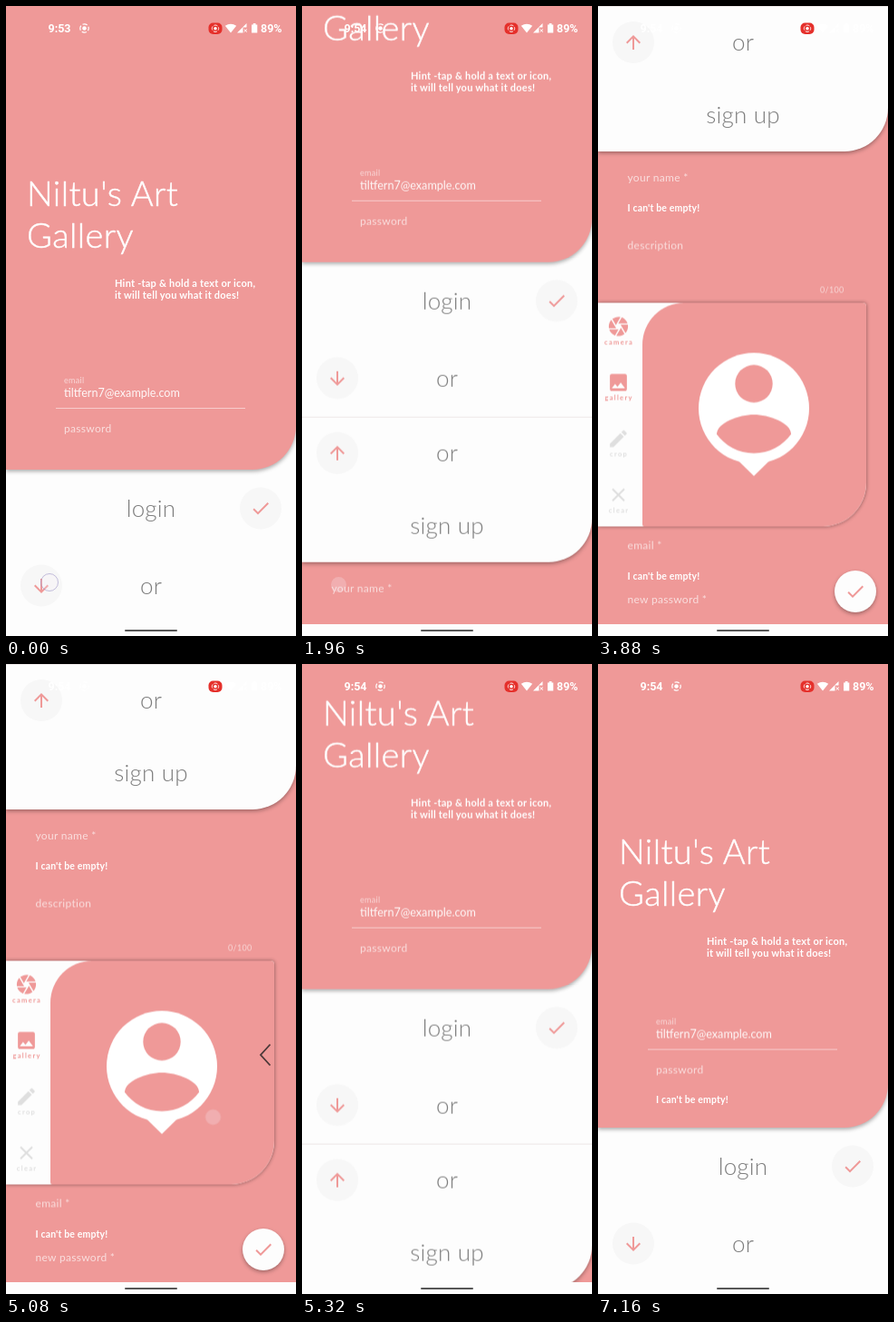
These frames come from a looping animation (320 px wide and 693 px high, 8400 ms). An HTML page:

```html
<!DOCTYPE html>
<html lang="en">
<head>
<meta charset="utf-8">
<title>Art gallery login</title>
<style>
html, body { margin: 0; width: 100%; height: 100%; overflow: hidden; background: #fdfdfd; }
svg { display: block; width: 100vw; height: 100vh; }
:root { --rose: #ef9998; --paper: #fdfdfd; --loop: 8.4s linear infinite; }

text { font-family: Lato, "Open Sans", sans-serif; font-weight: 300; fill: #fff; white-space: pre; }
.title { font-size: 38px; letter-spacing: .4px; stroke: #fff; stroke-width: .5px; }
.head { font-size: 26px; letter-spacing: .2px; text-anchor: middle; fill: #7d7d7d; }
.hint { font-size: 11px; font-weight: 700; letter-spacing: .22px; }
.field { font-size: 12px; font-weight: 400; letter-spacing: .3px; fill-opacity: .68; }
.small { font-size: 9px; font-weight: 400; letter-spacing: .3px; fill-opacity: .62; }
.value { font-size: 12.6px; font-weight: 400; fill-opacity: .92; }
.error { font-size: 10.5px; font-weight: 700; letter-spacing: .15px; }
.tag { font-size: 7.5px; font-weight: 700; letter-spacing: 1.3px; text-anchor: middle; fill: inherit; }
.status text { font: 600 12.5px Roboto, Inter, sans-serif; }

.rose { fill: var(--rose); }
.paper { fill: var(--paper); }
.disc { fill: #f7f7f7; }
.off { fill: #dfdfdf; }
.raised { filter: drop-shadow(0 2px 2px rgba(0,0,0,.32)); }
.card { filter: drop-shadow(0 .5px 2px rgba(0,0,0,.45)); }

.touch { fill: rgba(246,240,246,.25); stroke: rgba(150,140,195,.6); stroke-width: .9; }
.ripple { fill: rgba(0,0,0,.055); transform-box: fill-box; transform-origin: center; }

#pages { animation: pages var(--loop); }
@keyframes pages {
  0%, 22.11% { transform: translateY(0); }
  25.79%, 60.49% { transform: translateY(-680px); }
  64.17%, 100% { transform: translateY(0); }
}

/* validation messages push the fields apart */
.push { animation: push var(--loop); }
@keyframes push {
  0%, 43.33% { transform: translateY(0); animation-timing-function: ease-in-out; }
  45.71%, 100% { transform: translateY(18.5px); }
}
.warn { animation: warn var(--loop); }
@keyframes warn {
  0%, 43.33% { opacity: 0; transform: translateY(-4px); }
  45.71%, 100% { opacity: 1; transform: translateY(0); }
}
.lift { animation: lift var(--loop); }
@keyframes lift {
  0%, 82.38% { transform: translateY(0); animation-timing-function: ease-in-out; }
  84.76%, 100% { transform: translateY(-18.5px); }
}
.warn-login { animation: warn-login var(--loop); }
@keyframes warn-login {
  0%, 82.38% { opacity: 0; transform: translateY(-4px); }
  84.76%, 100% { opacity: 1; transform: translateY(0); }
}

.before { animation: before var(--loop); }
.after { animation: after var(--loop); }
@keyframes before { 0%, 5.71% { opacity: 1; } 5.72%, 100% { opacity: 0; } }
@keyframes after { 0%, 5.71% { opacity: 0; } 5.72%, 100% { opacity: 1; } }

#hold { animation: hold var(--loop); }
@keyframes hold {
  0%, 1.43% { opacity: 1; transform: translate(48px, 634px); }
  9.5% { opacity: 1; transform: translate(40px, 637px); }
  11.43%, 100% { opacity: 0; transform: translate(40px, 637px); }
}
#hold-ripple { animation: hold-ripple var(--loop); }
@keyframes hold-ripple {
  0%, 1.43% { opacity: 0; transform: scale(.3); }
  3% { opacity: 1; }
  9.5% { opacity: 1; transform: scale(1); }
  11.43%, 100% { opacity: 0; transform: scale(1); }
}

#tap { animation: tap var(--loop); }
@keyframes tap {
  0%, 17.14% { opacity: 0; stroke-opacity: 1; }
  18%, 21.2% { opacity: 1; stroke-opacity: 1; }
  22.5%, 23.4% { opacity: 1; stroke-opacity: 0; }
  25%, 100% { opacity: 0; stroke-opacity: 0; }
}
#tap-ripple { animation: tap-ripple var(--loop); }
@keyframes tap-ripple {
  0%, 17.14% { opacity: 0; transform: scale(.3); }
  18.2% { opacity: 1; }
  21% { opacity: 1; transform: scale(1); }
  23%, 100% { opacity: 0; transform: scale(1); }
}

#submit { animation: submit var(--loop); }
@keyframes submit {
  0%, 39.05% { opacity: 0; }
  39.8%, 43.5% { opacity: 1; }
  46.19%, 100% { opacity: 0; }
}
#submit-ripple { animation: submit-ripple var(--loop); }
@keyframes submit-ripple {
  0%, 39.05% { opacity: 0; transform: scale(.3); }
  40% { opacity: 1; }
  43.5% { opacity: 1; transform: scale(1); }
  46.19%, 100% { opacity: 0; transform: scale(1); }
}

#login { animation: login var(--loop); }
@keyframes login {
  0%, 79.05% { opacity: 0; }
  79.8%, 82.5% { opacity: 1; }
  85%, 100% { opacity: 0; }
}
#login-ripple { animation: login-ripple var(--loop); }
@keyframes login-ripple {
  0%, 79.05% { opacity: 0; transform: scale(.3); }
  80% { opacity: 1; }
  82.5% { opacity: 1; transform: scale(1); }
  85.24%, 100% { opacity: 0; transform: scale(1); }
}

/* back gesture from the right edge */
#swipe { animation: swipe var(--loop); stroke: none; }
@keyframes swipe {
  0%, 59.05% { opacity: 0; transform: translate(316px, 497px); }
  59.3% { opacity: 1; }
  60.46%, 61.95% { opacity: 1; transform: translate(228.5px, 498.5px); }
  62.9%, 100% { opacity: 0; transform: translate(228.5px, 498.5px); }
}
#chevron { animation: chevron var(--loop); }
@keyframes chevron {
  0%, 59.05% { opacity: 0; transform: translateX(28px); }
  60.46%, 62.1% { opacity: 1; transform: translateX(0); }
  62.9%, 100% { opacity: 0; transform: translateX(14px); }
}
</style>
</head>
<body>
<svg viewBox="0 0 320 693" preserveAspectRatio="none">
  <defs>
    <path id="down" d="M8 0L6.59-1.41 1 4.17V-8h-2V4.17L-6.58-1.42-8 0 0 8z"/>
    <path id="check" d="M-3 4.17L-7.17 0l-1.42 1.41L-3 7 9-5 7.59-6.41z"/>
    <g id="rec">
      <circle r="4.7" fill="none" stroke="#fff" stroke-width="1.2" stroke-dasharray="5.4 2" stroke-dashoffset="2.7"/>
      <circle r="2.3" fill="#fff"/>
    </g>
    <clipPath id="page"><rect width="320" height="680"/></clipPath>
  </defs>

  <rect class="paper" width="320" height="693"/>

  <g id="pages">
    <!-- login page -->
    <path class="rose raised" d="M0 0H320V462A48 48 0 0 1 272 510H0z"/>
    <text class="title" x="23" y="220">Niltu's Art</text>
    <text class="title" x="23" y="266">Gallery</text>
    <text class="hint" x="120" y="308.5">Hint -tap &amp; hold a text or icon,</text>
    <text class="hint" x="120" y="321.5">it will tell you what it does!</text>
    <g class="lift">
      <text class="small" x="64" y="415">email</text>
      <text class="value" x="64" y="430">tiltfern7@example.com</text>
      <path d="M55 442.5H264" stroke="#fff" stroke-opacity=".5"/>
      <text class="field" x="64" y="469">password</text>
    </g>
    <text class="error warn-login" x="64" y="483">I can't be empty!</text>

    <text class="head" x="160" y="562">login</text>
    <circle class="disc" cx="281" cy="552.5" r="23"/>
    <circle id="login-ripple" class="ripple" cx="281" cy="552.5" r="31"/>
    <use href="#check" class="rose" x="281" y="552.5"/>
    <text class="head" x="160" y="646.5">or</text>
    <circle class="disc" cx="39" cy="637.5" r="23"/>
    <circle id="hold-ripple" class="ripple" cx="39" cy="638" r="31"/>
    <circle id="tap-ripple" class="ripple" cx="39" cy="638" r="31"/>
    <use href="#down" class="rose" x="39" y="638"/>

    <!-- sign-up page -->
    <g transform="translate(0 680)" clip-path="url(#page)">
      <rect class="rose" y="80" width="320" height="620"/>
      <g class="push">
        <text class="field" x="32.5" y="249">description</text>
        <text class="small" x="245" y="297">0/100</text>
        <g class="card">
          <path class="paper" d="M0 308H292A4 4 0 0 1 296 312V506A48 48 0 0 1 248 554H0z"/>
          <path class="rose" d="M95 308H292A4 4 0 0 1 296 312V506A48 48 0 0 1 248 554H51Q49 554 49 552V354A46 46 0 0 1 95 308z"/>
        </g>
        <circle cx="172" cy="424" r="61" fill="#fff"/>
        <path d="M150 477L172 498.5 194 477z" fill="#fff"/>
        <circle class="rose" cx="172" cy="397" r="20.7"/>
        <path class="rose" d="M172 431C156 431 131 440 131 452.5C140 465 155 473.5 172 473.5S204 465 213 452.5C213 440 188 431 172 431z"/>
        <g class="rose" transform="translate(22.5 334)">
          <path transform="scale(1.06) translate(-12 -12)" d="M9.4 10.5l4.77-8.26C13.47 2.09 12.75 2 12 2c-2.4 0-4.6.85-6.32 2.25l3.66 6.35.06-.1zM21.54 9c-.92-2.92-3.15-5.26-6-6.34L11.88 9h9.66zm.26 1h-7.49l.29.5 4.76 8.25C21 16.97 22 14.61 22 12c0-.69-.07-1.35-.2-2zM8.54 12l-3.9-6.75C3.01 7.03 2 9.39 2 12c0 .69.07 1.35.2 2h7.49l-1.15-2zm-6.08 3c.92 2.92 3.15 5.26 6 6.34L12.12 15H2.46zm11.27 0l-3.9 6.76c.7.15 1.42.24 2.17.24 2.4 0 4.6-.85 6.32-2.25l-3.66-6.35-.93 1.6z"/>
          <text class="tag" x=".6" y="19.5">camera</text>
        </g>
        <g class="rose" transform="translate(22.5 395.7)">
          <path transform="scale(1.04) translate(-12 -12)" d="M21 19V5c0-1.1-.9-2-2-2H5c-1.1 0-2 .9-2 2v14c0 1.1.9 2 2 2h14c1.1 0 2-.9 2-2zM8.5 13.5l2.5 3.01L14.5 12l4.5 6H5l3.5-4.5z"/>
          <text class="tag" x=".6" y="19.5">gallery</text>
        </g>
        <g class="off" transform="translate(22.5 457.5)">
          <path transform="scale(1.04) translate(-12 -12)" d="M3 17.25V21h3.75L17.81 9.94l-3.75-3.75L3 17.25zM20.71 7.04c.39-.39.39-1.02 0-1.41l-2.34-2.34c-.39-.39-1.02-.39-1.41 0l-1.83 1.83 3.75 3.75 1.83-1.83z"/>
          <text class="tag" x=".6" y="19.5">crop</text>
        </g>
        <g class="off" transform="translate(22.5 519.2)">
          <path d="M-6.5-6.5L6.5 6.5M6.5-6.5L-6.5 6.5" stroke="#dfdfdf" stroke-width="2"/>
          <text class="tag" x=".6" y="19.5">clear</text>
        </g>
        <text class="field" x="32.5" y="579">email *</text>
        <g class="push">
          <text class="field" x="32.5" y="620">new password *</text>
          <text class="field" x="32.5" y="661">confirm password *</text>
        </g>
      </g>
      <text class="field" x="32.5" y="193">your name *</text>
      <text class="error warn" x="32.5" y="225.5">I can't be empty!</text>
      <text class="error warn" x="32.5" y="630.5">I can't be empty!</text>

      <path class="paper raised" d="M0 0H320V112A48 48 0 0 1 272 160H0z"/>
      <rect width="320" height=".8" fill="#ece4e4"/>
      <circle class="disc" cx="39" cy="40" r="23"/>
      <use href="#down" class="rose" transform="translate(39 40) scale(1 -1)"/>
      <text class="head" x="160" y="49">or</text>
      <text class="head" x="160" y="129">sign up</text>

      <circle class="paper raised" cx="284" cy="644" r="23"/>
      <circle id="submit-ripple" class="ripple" cx="284" cy="644" r="23"/>
      <use href="#check" class="rose" x="284" y="644"/>
    </g>
  </g>

  <g class="status" fill="#fff">
    <text class="before" x="46.5" y="28.5">9:53</text>
    <text class="after" x="46.5" y="28.5">9:54</text>
    <use href="#rec" x="86.5" y="24.5"/>
    <rect x="223.5" y="18.5" width="15" height="12.5" rx="5" fill="#e5302b"/>
    <use href="#rec" transform="translate(231 24.7) scale(.78)"/>
    <path d="M241.8 21.8Q248 17.5 254.2 21.8L248 29.5z"/>
    <path d="M265.5 19V23.5H261.5V29.5H255z"/>
    <path d="M262.7 25.4L266 28.7M266 25.4L262.7 28.7" stroke="#fff"/>
    <path d="M271 20.5H272.8V19H275.5V20.5H277.3V29.5H271z"/>
    <text x="281" y="28.5">89%</text>
  </g>

  <path id="chevron" d="M291.5 418.5L281 430 291.5 441.5" fill="none" stroke="#4a3838" stroke-width="1.8"/>

  <rect class="paper" y="680" width="320" height="13"/>
  <rect x="131" y="686" width="58" height="2" rx="1" fill="#565656"/>

  <circle id="hold" class="touch" r="9.5"/>
  <circle id="tap" class="touch" cx="40.5" cy="636.5" r="8.5"/>
  <circle id="submit" class="touch" cx="285" cy="642" r="8.5"/>
  <circle id="login" class="touch" cx="282" cy="554" r="8.5"/>
  <circle id="swipe" class="touch" r="8.5"/>
</svg>
</body>
</html>
```
